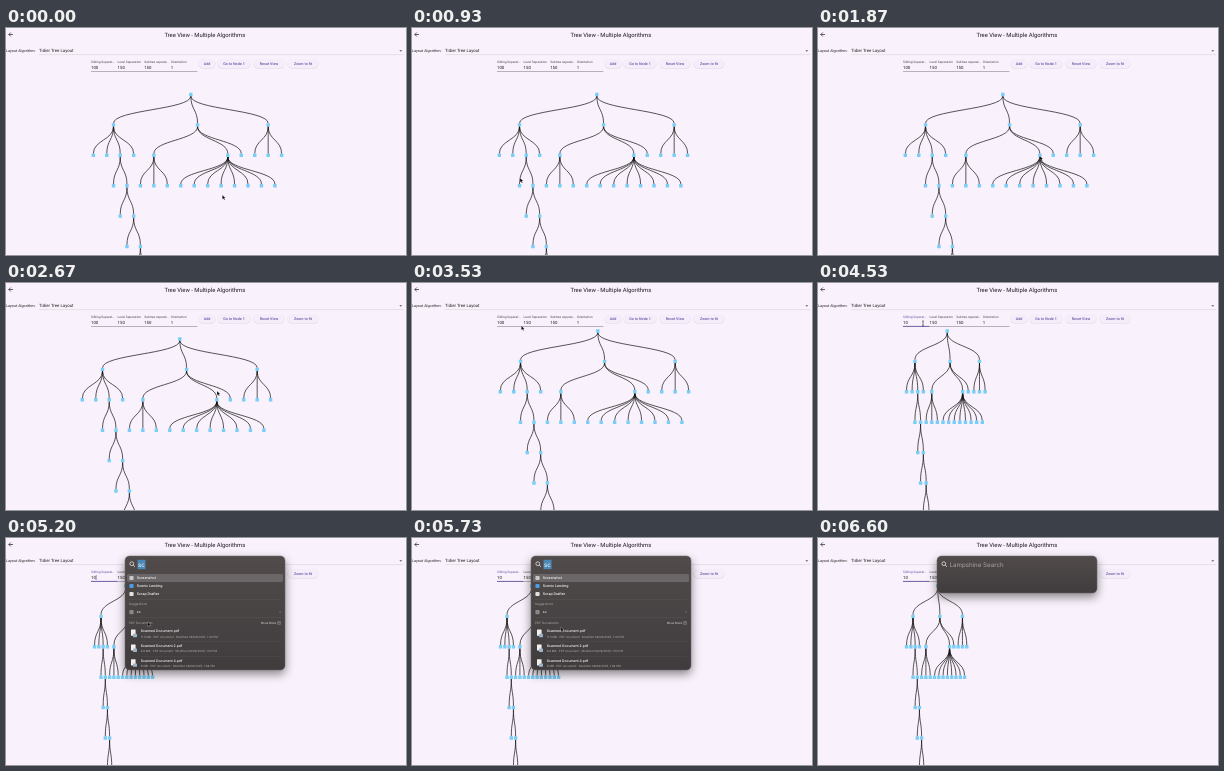
Write an HTML page that moves like this. It is 400x227 px and loops after 6.67 s.

```html
<!DOCTYPE html>
<html lang="en">
<head>
<meta charset="utf-8">
<title>Tree View</title>
<style>
html, body { margin: 0; width: 100%; height: 100%; overflow: hidden; background: #f9f1fb; }
svg { display: block; width: 400px; height: 227px; }
text { font-family: Roboto, sans-serif; text-rendering: geometricPrecision; }
#panel text { font-family: Inter, sans-serif; }
#panel { filter: drop-shadow(0 4px 5px rgba(0, 0, 0, .45)); }
</style>
</head>
<body>
<svg viewBox="0 0 400 227">
  <defs>
    <linearGradient id="dark" x2="0" y2="1">
      <stop stop-color="#514b4b"/><stop offset="1" stop-color="#403c3d"/>
    </linearGradient>
    <clipPath id="view"><rect y="45" width="400" height="182"/></clipPath>
  </defs>
  <g id="app">
    <path d="M7 6.5H2.8M4.8 4.5l-2 2 2 2" fill="none" stroke="#222" stroke-width=".7"/>
    <path d="M33 26.6H398" stroke="#c9c2cc" stroke-width=".4"/>
    <path d="M393.4 22.3h2.8l-1.4 1.4z" fill="#555"/>
  </g>
  <g clip-path="url(#view)">
    <path id="edges" fill="none" stroke="#111" stroke-width=".7"/>
    <path id="nodes" fill="#79cdf6"/>
  </g>
  <path id="focus" d="M85 43.4h26.5" stroke="#6750a4" stroke-width=".8"/>
  <path id="caret" stroke="#6750a4" stroke-width=".6"/>
  <g id="panel">
    <rect id="sheet" x="119" y="18" width="160" rx="4.5" fill="url(#dark)" stroke="#6b6666" stroke-width=".5"/>
    <g fill="none" stroke="#e8e4e4" stroke-width=".8"><circle cx="125.8" cy="25.7" r="1.9"/><path d="M127.2 27.1l1.8 1.8"/></g>
    <g id="hint"></g>
    <g id="results"></g>
  </g>
  <path id="arrow" d="M0 0V4.3L1.1 3.4 1.9 5 2.7 4.6 1.9 3.1H3.2Z" fill="#000" stroke="#fff" stroke-width=".25"/>
  <path id="beam" d="M-.8 -2.5H.8M0 -2.5V2.5M-.8 2.5H.8" stroke="#222" stroke-width=".6"/>
</svg>
<script>
const $ = id => document.getElementById(id);

function draw(parent, tag, attrs, text = '') {
  const el = document.createElementNS('http://www.w3.org/2000/svg', tag);
  for (const k in attrs) el.setAttribute(k, attrs[k]);
  el.textContent = text;
  return $(parent).appendChild(el);
}
const label = (parent, x, y, size, text, fill = '#222', anchor = 'start', weight = 400) =>
  draw(parent, 'text', { x, y, fill, 'font-size': size, 'text-anchor': anchor, 'font-weight': weight }, text);
const box = (parent, x, y, width, height, fill, rx = 0) =>
  draw(parent, 'rect', { x, y, width, height, fill, rx });

// Page header and controls
label('app', 198.8, 8.6, 5.85, 'Tree View - Multiple Algorithms', '#1d1b20', 'middle');
label('app', 0, 23.9, 3.75, 'Layout Algorithm:');
label('app', 33, 24, 4.35, 'Tidier Tree Layout');
const fields = [['Sibling Separat…', '100'], ['Level Separation', '150'], ['Subtree separat…', '150'], ['Orientation', '1']]
  .map(([name, value], i) => {
    const x = 85 + i * 26.6;
    box('app', x, 43.2, 26.6, .4, '#55505a');
    return [label('app', x, 34.7, 3.2, name, '#49454f'), label('app', x, 41, 4.3, value)];
  });
for (const [x, w, name] of [[201, 17, 'Add'], [228, 33, 'Go to Node 1'], [263, 31, 'Reset View'], [297, 31, 'Zoom to fit']]) {
  box('app', x - w / 2, 31.4, w, 9.2, '#dcd3e3', 4.6);
  box('app', x - w / 2, 31, w, 9, '#f5edf9', 4.5);
  label('app', x, 36.8, 3.7, name, '#6750a4', 'middle', 500);
}

// Search panel
label('hint', 131.5, 28.8, 6.2, 'Lampshine Search', '#aaa4a4');
box('results', 131.5, 21.8, 8, 9.4, '#4b88b5');
label('results', 131.9, 28.8, 6.2, 'sc', '#fff');
box('results', 121, 36, 156, 8, '#6b6768', 1.5);
[['Screenshot', '#c9c9cb'], ['Scenic Lending', '#4d9be0'], ['Scrap Drafter', '#e4e2df']].forEach(([name, color], i) => {
  box('results', 123.4, 37.9 + i * 8, 4.2, 4.2, color, 1);
  label('results', 130.8, 41.3 + i * 8, 3.5, name, '#fff', 'start', 500);
});
const muted = '#b3adad';
label('results', 123, 67, 3.1, 'Suggestions', muted);
box('results', 123.4, 72, 4.2, 4.2, '#8b8788', 1);
label('results', 130.8, 75.4, 3.5, 'sc', '#fff');
label('results', 274, 75.4, 4, '›', muted, 'middle');
label('results', 123, 85.5, 3.1, 'PDF Documents', muted);
label('results', 275, 85.5, 2.9, 'Show More ⊕', '#ddd', 'end');
for (const y of [61, 79.5]) box('results', 123, y, 152, .3, '#625d5e');
[['', '11.5 MB', '1:30'], [' 2', '6.6 MB', '1:52'], [' 4', '9 MB', '1:38']].forEach(([suffix, size, time], i) => {
  const y = 94.2 + i * 14.8;
  box('results', 125, y - 2.6, 4.6, 6.2, '#f1f0ee', .4);
  box('results', 127, y + 1.6, 4, 3.4, '#9db4c4', .6);
  label('results', 134.8, y, 3.4, `Scanned Document${suffix}.pdf`, '#fff', 'start', 500);
  label('results', 134.8, y + 5.3, 2.9, `${size} · PDF document · Modified 06/06/2025, ${time} PM`, muted);
  if (i) box('results', 134.8, y - 5.3, 140, .3, '#5a5556');
});

// Tree: x counts sibling steps from the first child of the root
const tree = [];
function add(parent, x, count = 1) {
  for (let i = 0; i < count; i++) tree.push({ parent, x: x + i, level: parent ? parent.level + 1 : 0 });
  return tree[tree.length - 1];
}
const root = add(null, 5.75);
const left = add(root, 0), middle = add(root, 6.25), right = add(root, 11.5);
add(left, -1.5, 2);
let chain = add(left, .5);
add(left, 1.5);
for (const x of [0, .5, 1, 1.5]) chain = add(chain, x, 2);
add(add(middle, 3), 2, 3);
add(add(middle, 8.5), 5, 8);
add(middle, 9.5);
add(right, 10.5, 3);

// Key positions: [ms, x, y]
const pan = [[2000, 0, 0], [2150, 8, -16], [2280, 22, -19], [2420, 20, -4], [2530, 1, -3],
  [2670, -11, -10.5], [2900, -7, -17], [3200, 1, -18.5]];
const pointer = [[0, 216.3, 167], [230, 268, 90], [400, 240, 36], [570, 155, 70], [730, 149, 120],
  [800, 149, 120], [930, 108, 150], [1080, 140, 70], [1220, 230, 35], [1320, 284, 90], [1400, 225, 129],
  [1600, 221.8, 128], [1870, 221.8, 128], [2000, 222, 118.5], [3199, 222, 118.5], [3200, 223, 100],
  [3270, 223, 100], [3390, 300, 190], [3530, 109.3, 42.8], [3680, 105, 40.5], [4670, 105, 40.5],
  [4870, 259, 90], [5070, 259, 90], [5190, 141.5, 84], [5900, 150, 90]];

function along(keys, t) {
  const next = keys.findIndex(k => k[0] > t);
  if (next < 1) return (next ? keys[keys.length - 1] : keys[0]).slice(1);
  const a = keys[next - 1], b = keys[next];
  const p = (t - a[0]) / (b[0] - a[0]), e = p * p * (3 - 2 * p);
  return [1, 2].map(i => a[i] + (b[i] - a[i]) * e);
}
const clamp = v => Math.max(0, Math.min(1, v));
const show = (id, on) => $(id).style.display = on ? '' : 'none';

function render(t) {
  const [dx, dy] = along(pan, t);
  const shrink = clamp((t - 4000) / 620);
  const step = 13.45 - 9.15 * shrink;
  const px = n => 107.5 + dx - 13.5 * shrink + n.x * step;
  const py = n => 66.5 + dy + n.level * 30.4;
  $('edges').setAttribute('d', tree.slice(1).map(n => {
    const x0 = px(n.parent), y0 = py(n.parent) + 1.6, x1 = px(n), y1 = py(n) - 1.6, mid = (y0 + y1) / 2;
    return `M${x0} ${y0}C${x0} ${mid} ${x1} ${mid} ${x1} ${y1}`;
  }).join(''));
  $('nodes').setAttribute('d', tree.map(n => `M${px(n) - 1.7} ${py(n) - 1.7}h3.4v3.4h-3.4z`).join(''));

  const focused = t >= 3620, edited = t >= 4000;
  fields[0][0].setAttribute('fill', focused ? '#6750a4' : '#49454f');
  fields[0][1].textContent = edited ? '10' : '100';
  show('focus', focused);
  show('caret', focused && (!edited || Math.floor((t - 4000) / 500) % 2 === 0));
  $('caret').setAttribute('d', `M${edited ? 90.2 : 92.7} 37v5`);

  const expanded = t < 6000;
  $('panel').style.opacity = clamp((t - 5070) / 100);
  $('sheet').setAttribute('height', expanded ? 114 : 37);
  show('results', expanded);
  show('hint', !expanded);

  let [cx, cy] = along(pointer, t);
  if (t > 2000 && t < 3199) { cx = 222 + dx; cy = 118.5 + dy; }
  const typing = t >= 3600 && t < 4700;
  show('arrow', !typing && expanded);
  show('beam', typing);
  for (const id of ['arrow', 'beam']) $(id).setAttribute('transform', `translate(${cx} ${cy})`);
}

const start = performance.now();
function tick() {
  render((performance.now() - start) % 6670);
  requestAnimationFrame(tick);
}
tick();
</script>
</body>
</html>
```
